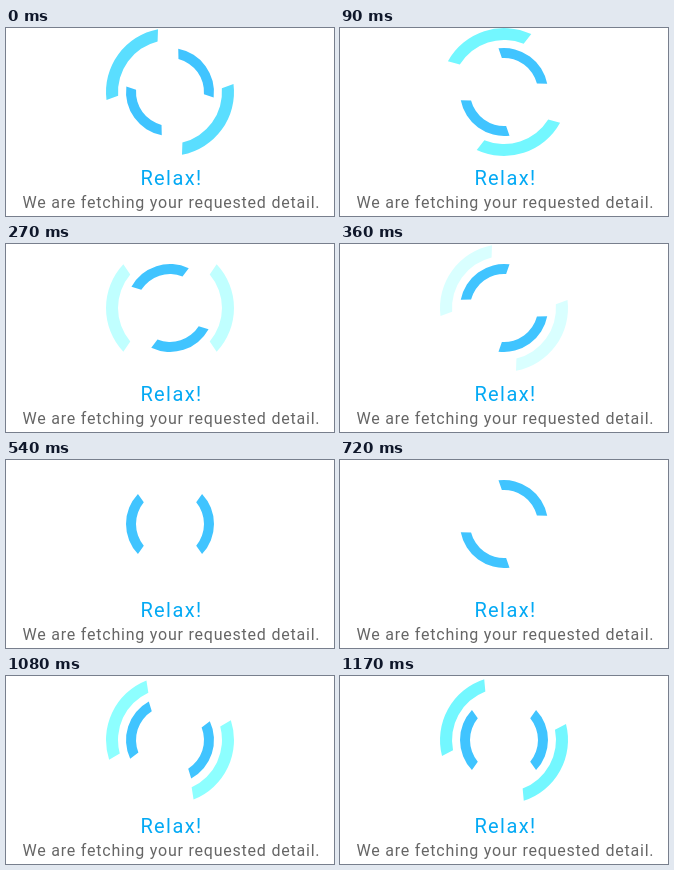
An HTML page that plays this animation: 328 px wide and 188 px high, repeating every 1.26 s.

```html
<!DOCTYPE html>
<html lang="en">
<head>
<meta charset="utf-8">
<title>Loading</title>
<style>
  html, body { margin: 0; width: 100%; height: 100%; overflow: hidden; background: #fff; }
  svg { display: block; width: 328px; height: 188px; }
  text { font-family: Roboto, sans-serif; }
</style>
</head>
<body>
<svg viewBox="0 0 328 188">
  <g transform="translate(164 64)">
    <path id="outer"/>
    <path id="inner" fill="#40c4ff"/>
  </g>
  <text x="134.4" y="157" font-size="20" letter-spacing="1.4" fill="#03a9f4">Relax!</text>
  <text x="16.5" y="180" font-size="16" letter-spacing="0.78" fill="#666">We are fetching your requested detail.</text>
</svg>
<script>
const STEP = 90, STEPS = 14, UNITS = 20, HALF = 43.2;
const outer = document.getElementById('outer');
const inner = document.getElementById('inner');

const point = (r, deg) => {
  const a = deg * Math.PI / 180;
  return (r * Math.cos(a)).toFixed(2) + ' ' + (r * Math.sin(a)).toFixed(2);
};

// Arc segment centred on an angle; its inner edge is cut a little shorter.
function segment(R, r, cut, mid) {
  const a = HALF, b = HALF - cut;
  return `M${point(R, mid - a)}A${R} ${R} 0 0 1 ${point(R, mid + a)}` +
         `L${point(r, mid + b)}A${r} ${r} 0 0 0 ${point(r, mid - b)}Z`;
}

const pair = (R, r, cut) => segment(R, r, cut, 0) + segment(R, r, cut, 180);

outer.setAttribute('d', pair(64, 52, 3));
inner.setAttribute('d', pair(44, 34, 3.6));

function tint(level) {
  const lift = c => Math.min(255, Math.round(c + 25.5 * level));
  return `rgb(${lift(64)},${lift(196)},255)`;
}

function draw(ms) {
  const step = Math.floor(ms / STEP) % STEPS;
  const unit = Math.floor(step * UNITS / STEPS + 0.2);
  // The outer ring spins while it fades out, then eases back while it fades in.
  const fading = unit < UNITS / 2;
  const level = fading ? unit + 1 : UNITS - unit;
  const angle = fading ? 36 * level : 36 - 3.6 * level;
  outer.setAttribute('transform', `rotate(${angle})`);
  outer.setAttribute('fill', tint(level));
  inner.setAttribute('transform', `rotate(${-36 - 18 * unit})`);
}

const start = performance.now();
function tick() {
  draw(performance.now() - start);
  requestAnimationFrame(tick);
}
tick();
</script>
</body>
</html>
```
